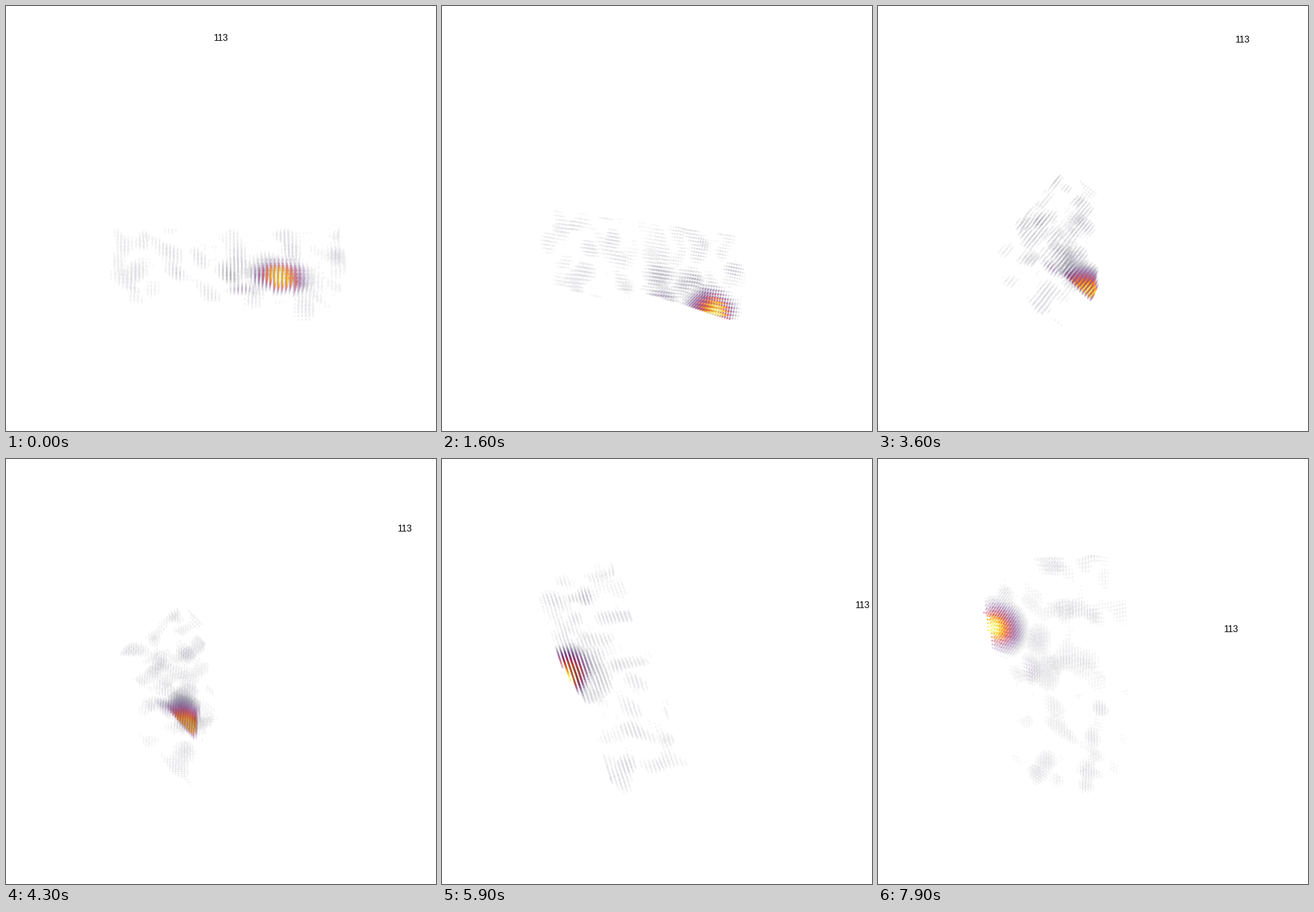
A matplotlib script that plays this animation: 753x744 px, repeating every 8 s.

```python
import numpy as np
import matplotlib.pyplot as plt
from matplotlib.animation import FuncAnimation

W, H, DPI = 753, 744, 100
FRAMES, INTERVAL = 80, 100
STEP = np.radians(3)                           # turn per frame
TILT = np.radians(25.1)                        # camera tilt
CAMERA = H / 2 / np.tan(np.radians(15))        # 30 degree view angle
PITCH = 6.4                                    # voxel spacing
LABEL = np.array([0, 392.5, 0])
LEAN = np.radians(35.5)
AXIS = np.array([np.sin(LEAN), np.cos(LEAN), 0])

# Main activations: centre, spread, peak
SPOTS = [
    ((93, -146, 82), (27, 26, 34), 0.92),
    ((36, -136, 2), (18, 10, 16), 0.22),
    ((22, -98, 5), (28, 18, 20), 0.11),
    ((75, -100, 26), (22, 20, 20), 0.11),
    ((-141, -104, 13), (16, 16, 16), 0.11),
    ((198, -75, 5), (14, 14, 20), 0.11),
    ((135, -107, -29), (13, 13, 13), 0.11),
]


def inside(x, u, f):
    """One hemisphere with a slanted side and a sloping underside."""
    shell = ((x - 12) / 205) ** 4 + ((u + 20) / 162) ** 4 + ((f + 5) / 125) ** 4
    side = np.minimum(-131 - 0.2 * x, -138)
    under = np.minimum(61 - 0.94 * (u + 91), 98)
    return (shell < 1) & (u < -12) & (u > side) & (f < under)


def bump(pts, centre, spread, peak):
    r2 = (((pts - centre) / spread) ** 2).sum(axis=1)
    return peak * np.exp(-0.5 * r2 ** 1.25)


def ripple(pts, rng, waves=30):
    """Smooth noise with unit spread: a sum of random plane waves."""
    total = np.zeros(len(pts))
    for _ in range(waves):
        way = rng.normal(size=3)
        way *= 2 * np.pi / rng.uniform(38, 90) / np.linalg.norm(way)
        total += np.cos(pts @ way + rng.uniform(0, 2 * np.pi))
    return total * np.sqrt(2 / waves)


def build_cloud():
    rng = np.random.default_rng(113)
    grid = np.meshgrid(np.arange(-193, 216, PITCH) - 2.1,
                       np.arange(-186, -6, PITCH),
                       np.arange(-95, 118, PITCH), indexing="ij")
    pts = np.stack([g.ravel() for g in grid], axis=1)
    pts = pts[inside(*pts.T)]
    noise = ripple(pts, rng)
    val = np.minimum(0.04 * (noise - 0.2), 0.09)
    for spot in SPOTS:
        val = np.maximum(val, bump(pts, *spot) * (1 + 0.08 * noise))
    keep = val > 0.047
    return pts[keep], np.clip(val[keep], 0, 1)


def turn(angle):
    """Rotation about AXIS followed by the camera tilt."""
    x, y, z = AXIS
    cross = np.array([[0, -z, y], [z, 0, -x], [-y, x, 0]])
    spin = (np.cos(angle) * np.eye(3) + np.sin(angle) * cross
            + (1 - np.cos(angle)) * np.outer(AXIS, AXIS))
    c, s = np.cos(TILT), np.sin(TILT)
    return np.array([[1, 0, 0], [0, c, s], [0, -s, c]]) @ spin


def project(pts, rot):
    cam = pts @ rot.T
    depth = cam[..., 2]
    return cam[..., :2] * (CAMERA / (CAMERA - depth))[..., None], depth


points, values = build_cloud()
colors = plt.get_cmap("inferno")(values)
colors[:, 3] = 0.9 * values ** 1.15

fig = plt.figure(figsize=(W / DPI, H / DPI), dpi=DPI, facecolor="white")
ax = fig.add_axes([0, 0, 1, 1])
ax.set_xlim(-W / 2, W / 2)
ax.set_ylim(-H / 2, H / 2)
ax.axis("off")

dots = ax.scatter(points[:, 0], points[:, 1], s=(3.6 * 72 / DPI) ** 2, linewidths=0)
label = ax.text(0, 0, "113", ha="center", va="baseline", color="black",
                family="Liberation Sans", fontsize=16 * 72 / DPI)


def update(i):
    rot = turn(i * STEP)
    xy, depth = project(points, rot)
    order = np.argsort(depth)
    dots.set_offsets(xy[order])
    dots.set_facecolors(colors[order])
    (x, y), _ = project(LABEL, rot)
    label.set_position((x, y - 6))
    return dots, label


anim = FuncAnimation(fig, update, frames=FRAMES, interval=INTERVAL,
                     repeat=True, repeat_delay=0, blit=False)
plt.show()
```
